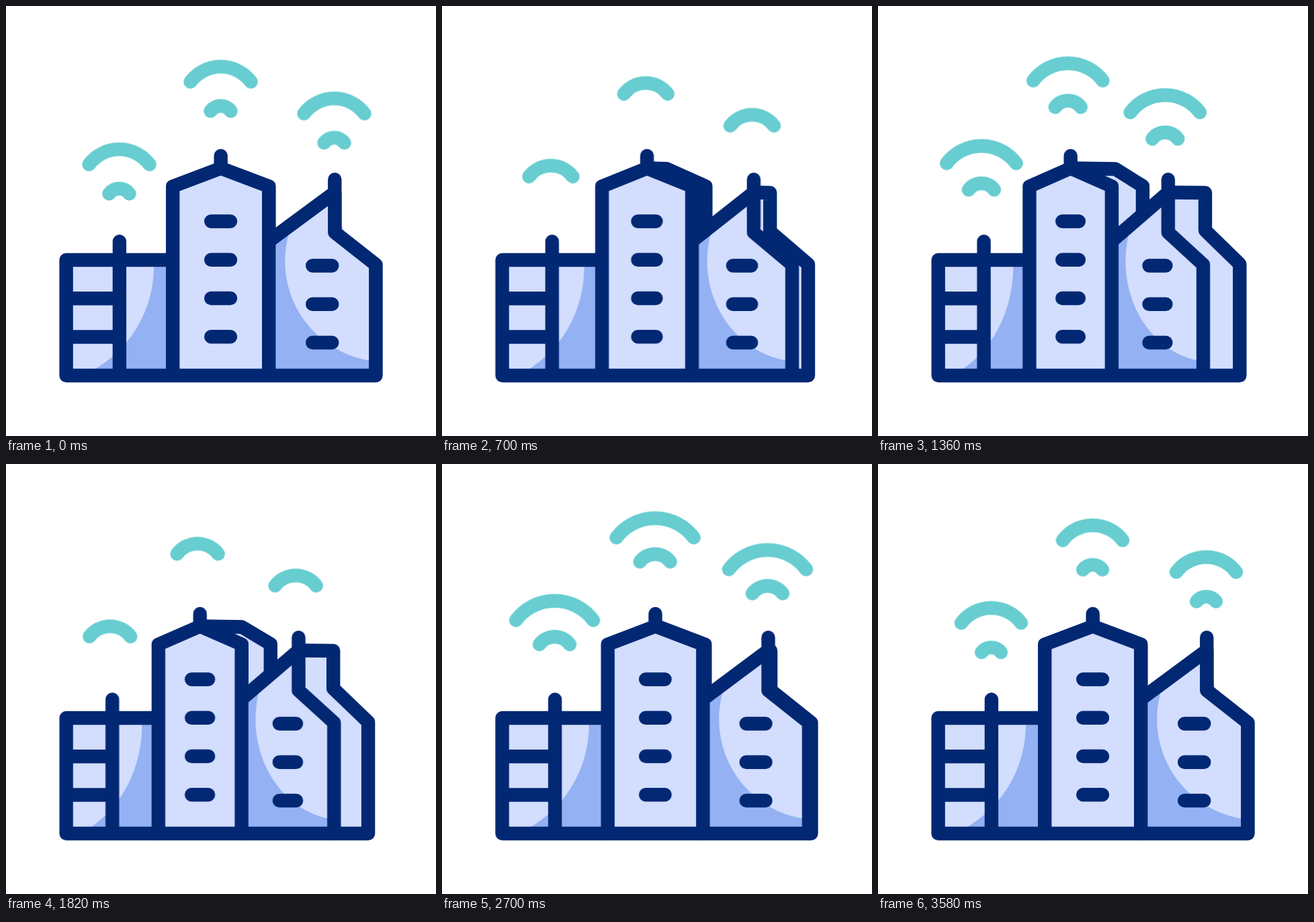
Recreate the animation shown at these times as an HTML page without scripts. Size 640x640 px, loop 3600 ms.

```html
<!DOCTYPE html>
<html lang="en">
<head>
<meta charset="utf-8">
<title>Smart city</title>
<style>
  html, body { margin: 0; width: 100%; height: 100%; overflow: hidden; background: #fff; }
  svg { display: block; width: 640px; height: 640px; }

  path { vector-effect: non-scaling-stroke; }
  .line, .back { stroke: #022873; }
  .line, .back, .wave { stroke-width: 20.4px; stroke-linecap: round; stroke-linejoin: round; }
  .line, .wave { fill: none; }
  .light, .back { fill: #d3ddfd; }
  .shade { fill: #93b1f3; }

  /* The fronts narrow towards the left wall while the side walls come into view. */
  .front, .back, .signal {
    animation: 3600ms cubic-bezier(.5, 0, .5, 1) infinite;
  }
  .front { transform-origin: 89.6px 0; animation-name: narrow; }
  .tower.back { animation-name: tower-side; }
  .house.back { animation-name: house-side; }
  .signal { animation-name: follow; }

  @keyframes narrow {
    0%, 83.333%, 100% { transform: scaleX(1); }
    41.667% { transform: scaleX(.8543); }
  }
  @keyframes follow {
    0%, 83.333%, 100% { transform: translateX(0); }
    41.667% { transform: translateX(var(--shift)); }
  }
  @keyframes tower-side {
    0%, 83.333%, 100% { d: path("M391.2 350L391.2 268.5L319.7 241.5L319.7 242L391.2 268.5L391.2 330"); }
    41.667% { d: path("M347.3 350L347.3 268.5L286.2 241.5L353.5 242.5L394 268L394 330"); }
  }
  @keyframes house-side {
    0%, 83.333%, 100% { d: path("M489.3 277.5L489.3 278L489.3 337L550.3 385L550.3 550L550.3 550"); }
    41.667% { d: path("M431 277.5L487 278L487 334L538.2 384L538.2 550L483.2 550"); }
  }

  /* Each signal has three waves, 1200 ms apart. */
  .wave {
    stroke: #67cdd1;
    d: path("M-60 30A75 75 0 0 1 60 30");
    animation: spread 3600ms linear -480ms infinite;
  }
  .wave:nth-child(2) { animation-delay: -1680ms; }
  .wave:nth-child(3) { animation-delay: -2880ms; }
  @keyframes spread {
    0% { transform: translateY(0) scale(.002); }
    13.333% { transform: translateY(-30.5px) scale(.25); }
    46.667% { transform: translateY(-89px) scale(.75); }
    56.66% { transform: translateY(-100.5px) scale(1); opacity: 1; }
    56.667%, 100% { transform: translateY(-100.5px) scale(1); opacity: 0; }
  }
</style>
</head>
<body>
<svg viewBox="0 0 640 640">
  <path class="tower back" d="M391.2 350L391.2 268.5L319.7 241.5L319.7 242L391.2 268.5L391.2 330"/>
  <path class="house back" d="M489.3 277.5L489.3 278L489.3 337L550.3 385L550.3 550L550.3 550"/>

  <g class="front">
    <path class="shade" d="M89.6 378H248.2V550H89.6Z"/>
    <path class="light" d="M89.6 378H219.7A176 176 0 0 1 112.8 550H89.6Z"/>
    <path class="line" d="M248.2 378H89.6V550H248.2M168.9 350.5V550M89.6 435.3H168.9M89.6 492.5H168.9"/>

    <path class="shade" d="M391.2 350L489.3 277.5V337L550.3 385V550H391.2Z"/>
    <path class="light" d="M426 324L489.3 277.5V337L550.3 385V529A150 150 0 0 1 426 324Z"/>
    <path class="line" d="M391.2 350L489.3 277.5V337L550.3 385V550H391.2M489.3 258.3V277.5"/>
    <path class="line" d="M456.2 386.5H485.3M456.2 443.7H485.3M456.2 501H485.3"/>

    <path class="light" d="M248.2 550V268.5L319.7 241.5L391.2 268.5V550Z"/>
    <path class="line" d="M248.2 550V268.5L319.7 241.5L391.2 268.5V550ZM319.7 223V241.5"/>
    <path class="line" d="M305.2 320.5H334M305.2 377.7H334M305.2 435H334M305.2 492.2H334"/>
  </g>

  <g transform="translate(168.5 302.3)">
    <g class="signal" style="--shift: -14.8px">
      <path class="wave"/><path class="wave"/><path class="wave"/>
    </g>
  </g>
  <g transform="translate(319.5 179.3)">
    <g class="signal" style="--shift: -37.2px">
      <path class="wave"/><path class="wave"/><path class="wave"/>
    </g>
  </g>
  <g transform="translate(488.5 226.6)">
    <g class="signal" style="--shift: -62px">
      <path class="wave"/><path class="wave"/><path class="wave"/>
    </g>
  </g>
</svg>
</body>
</html>
```
